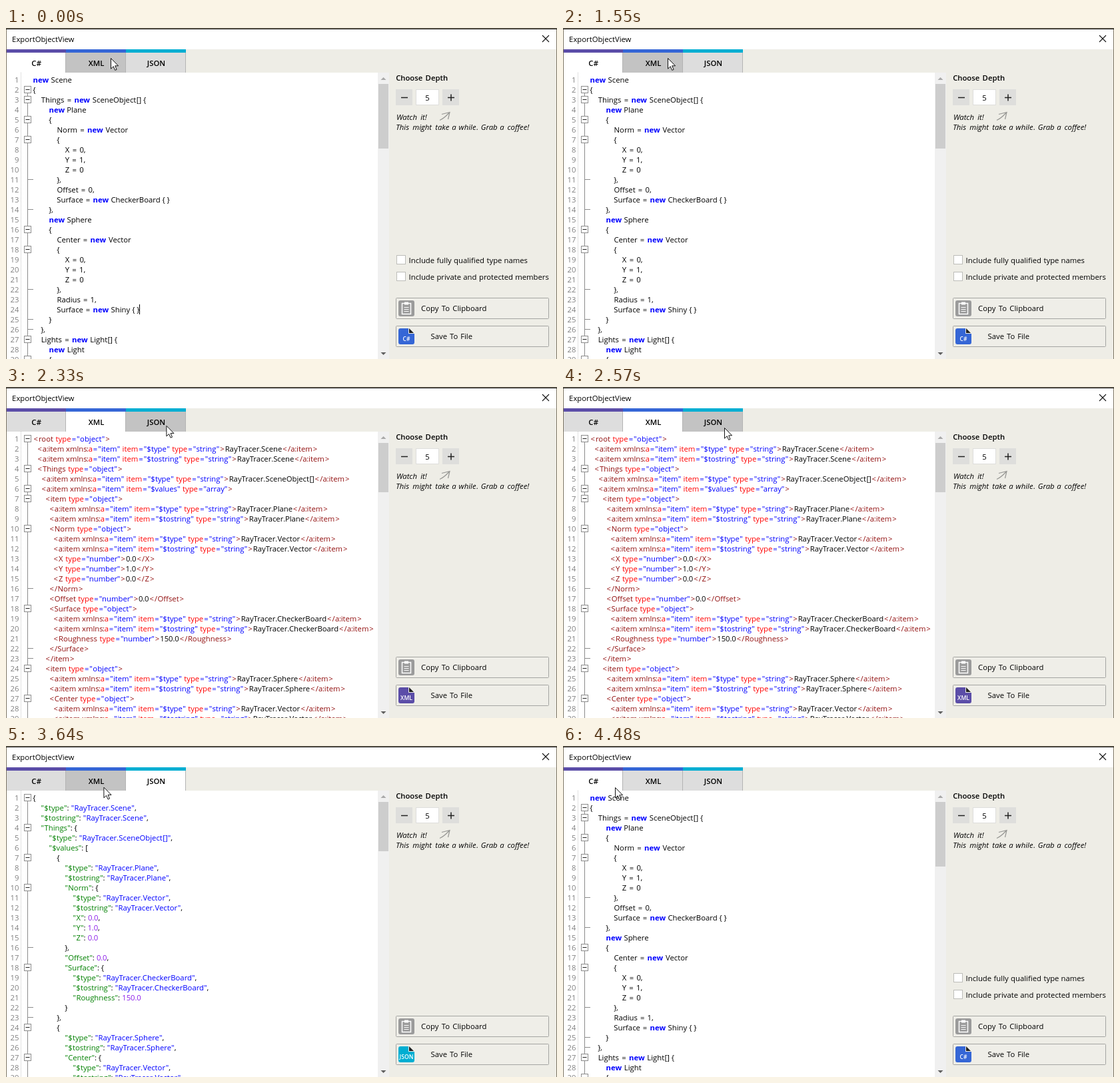
These frames come from a looping animation (827x497 px, 5280 ms). An HTML page:

```html
<!DOCTYPE html>
<html lang="en">
<head>
<meta charset="utf-8">
<title>ExportObjectView</title>
<style>
  html, body { margin: 0; width: 100%; height: 100%; overflow: hidden; background: #eeede6; }
  svg { display: block; width: 827px; height: 497px; }
  text { font-family: "Open Sans", "Noto Sans", sans-serif; font-size: 11.3px; text-anchor: middle; }
</style>
</head>
<body>
<svg id="stage" viewBox="0 0 827 497" xmlns="http://www.w3.org/2000/svg"></svg>
<script>
const LOOP = 5280;
const PURPLE = '#5b4da8', BLUE = '#3566d6', CYAN = '#00aed2';
const svg = document.getElementById('stage');

function add(parent, name, attrs, content) {
  const el = document.createElementNS('http://www.w3.org/2000/svg', name);
  for (const key in attrs) el.setAttribute(key, attrs[key]);
  if (content) el.textContent = content;
  parent.appendChild(el);
  return el;
}
const rect = (parent, x, y, width, height, fill, more) =>
  add(parent, 'rect', { x, y, width, height, fill, ...more });
const line = (parent, d, stroke, more) =>
  add(parent, 'path', { d, stroke, fill: 'none', ...more });
const show = (el, on) => el.setAttribute('visibility', on ? 'visible' : 'hidden');

// Advance widths in thousandths of an em, used to lay out words.
const groups = {
  217: '.,:;', 242: 'ijl', 266: 'I', 274: ' ', 284: '!', 302: '[]{}', 313: 'f', 339: 't',
  348: 'r', 357: 'J', 390: '/', 392: '"', 424: 's', 452: 'z', 459: 'x', 462: 'c', 471: 'L',
  479: 'v', 484: 'y', 488: 'F', 497: 'k', 506: 'E', 509: 'a', 523: 'e', 524: 'T', 531: 'S',
  539: '$0123456789', 553: 'Y', 560: 'P', 565: 'hnu', 570: 'Z', 573: 'B', 586: 'o',
  588: 'bdgpq', 590: 'X', 591: '#', 598: 'R', 619: 'C', 621: 'V', 684: '<>=+', 686: 'G',
  701: 'D', 710: 'H', 723: 'w', 748: 'N', 754: 'O', 861: 'm', 898: 'M', 934: 'W'
};
const advance = {};
for (const w in groups) for (const c of groups[w]) advance[c] = w * 0.01205;
const boldness = { 400: 1, 600: 1.04, 700: 1.085 };

function measure(s, weight = 400) {
  let w = 0;
  for (const c of s) w += advance[c] || 6.5;
  return w * boldness[weight];
}

// Runs are [string, colour, weight]; every word is centred in its own box.
function write(parent, x, y, runs, more) {
  const el = add(parent, 'text', { y, ...more });
  for (const [s, fill, weight = 400] of runs) {
    for (const word of s.match(/\s+|[A-Za-z]+!?|\d+|./g)) {
      const w = measure(word, weight);
      if (word.trim()) {
        add(el, 'tspan', { x: (x + w / 2).toFixed(2), fill, 'font-weight': weight }, word);
      }
      x += w;
    }
  }
}
const label = (parent, x, y, s, weight, more) =>
  write(parent, x, y, [[s, '#000', weight]], more);

// Code listings; one leading space is one indent level.
const csharp = `new Scene
{
 Things = new SceneObject[] {
  new Plane
  {
   Norm = new Vector
   {
    X = 0,
    Y = 1,
    Z = 0
   },
   Offset = 0,
   Surface = new CheckerBoard { }
  },
  new Sphere
  {
   Center = new Vector
   {
    X = 0,
    Y = 1,
    Z = 0
   },
   Radius = 1,
   Surface = new Shiny { }
  }
 },
 Lights = new Light[] {
  new Light
  {`.split('\n');

const pad = n => ' '.repeat(n);
const xOpen = (n, tag) => `${pad(n)}<${tag} type="object">`;
const xNum = (n, tag, v) => `${pad(n)}<${tag} type="number">${v}</${tag}>`;
const xItem = (n, key, type) =>
  `${pad(n)}<a:item xmlns:a="item" item="$${key}" type="string">RayTracer.${type}</a:item>`;
const xPair = (n, type) => [xItem(n, 'type', type), xItem(n, 'tostring', type)];
const xml = [
  xOpen(0, 'root'), ...xPair(1, 'Scene'), xOpen(1, 'Things'), xItem(2, 'type', 'SceneObject[]'),
  '  <a:item xmlns:a="item" item="$values" type="array">',
  xOpen(3, 'item'), ...xPair(4, 'Plane'), xOpen(4, 'Norm'), ...xPair(5, 'Vector'),
  xNum(5, 'X', '0.0'), xNum(5, 'Y', '1.0'), xNum(5, 'Z', '0.0'), '    </Norm>',
  xNum(4, 'Offset', '0.0'), xOpen(4, 'Surface'), ...xPair(5, 'CheckerBoard'),
  xNum(5, 'Roughness', '150.0'), '    </Surface>', '   </item>',
  xOpen(3, 'item'), ...xPair(4, 'Sphere'), xOpen(4, 'Center'), ...xPair(5, 'Vector')
];

const jLine = (n, key, v) => `${pad(n)}"${key}": ${v}`;
const jType = (n, key, type) => jLine(n, key, `"RayTracer.${type}",`);
const jPair = (n, type) => [jType(n, '$type', type), jType(n, '$tostring', type)];
const json = [
  '{', ...jPair(1, 'Scene'), jLine(1, 'Things', '{'), jType(2, '$type', 'SceneObject[]'),
  jLine(2, '$values', '['), '   {', ...jPair(4, 'Plane'), jLine(4, 'Norm', '{'),
  ...jPair(5, 'Vector'), jLine(5, 'X', '0.0,'), jLine(5, 'Y', '1.0,'), jLine(5, 'Z', '0.0'),
  '    },', jLine(4, 'Offset', '0.0,'), jLine(4, 'Surface', '{'), ...jPair(5, 'CheckerBoard'),
  jLine(5, 'Roughness', '150.0'), '    }', '   },', '   {', ...jPair(4, 'Sphere'),
  jLine(4, 'Center', '{'), ...jPair(5, 'Vector')
];

// Each regex group takes the colour at the same index.
const views = [
  { name: 'C#', color: PURPLE, icon: BLUE, lines: csharp, indent: 12, thumb: 97,
    folds: [2, 3, 5, 7, 16, 18, 27, 29], ends: [11, 14, 22, 25, 26],
    syntax: /(\bnew\b)|((?:(?!\bnew\b).)+)/g, colors: ['#0000ff', '#000'], bold: 0 },
  { name: 'XML', color: BLUE, icon: PURPLE, lines: xml, indent: 6, thumb: 74,
    folds: [1, 4, 6, 7, 10, 18, 24, 27], ends: [16, 22, 23],
    syntax: /(<\/?[\w:]+|>|xmlns:)|(\w+(?==))|(="[^"]*")|([^<>"=\s]+|\s+)/g,
    colors: ['#921010', '#ff0000', '#0000ff', '#000'] },
  { name: 'JSON', color: CYAN, icon: CYAN, lines: json, indent: 12, thumb: 74,
    folds: [1, 4, 7, 10, 18, 24, 27], ends: [16, 22, 23],
    syntax: /("[^"]*"(?=:))|("[^"]*")|(\d[\d.]*)|([^"\d]+)/g,
    colors: ['#008000', '#0000ff', '#8a1be8', '#000'] }
];

function colorRuns(view, s) {
  return [...s.matchAll(view.syntax)].map(m => {
    const i = m.slice(1).findIndex(g => g !== undefined);
    return [m[0], view.colors[i], i === view.bold ? 700 : 400];
  });
}

// Window
rect(svg, 0, 0, 827, 497, '#eeede6');
rect(svg, 0, 0, 827, 32, '#fff');
label(svg, 8.5, 21, 'ExportObjectView');
line(svg, 'M805 11L815 21M815 11L805 21', '#111', { 'stroke-width': 1.1 });

// Tabs
const tabs = views.map((view, i) => {
  const x = i * 90;
  const body = rect(svg, x, 37, 90, 30, '#ddd');
  rect(svg, x, 32, 90, 5, view.color);
  rect(svg, x + 89, 37, 1, 30, '#b4b4b4');
  label(svg, x + 45.5 - measure(view.name, 600) / 2, 57, view.name, 600);
  return body;
});

// Editor
rect(svg, 1, 67, 557, 430, '#fff');
line(svg, 'M22.5 67V497', '#c4c4c4', { 'stroke-dasharray': '1 1' });
for (let n = 1; n < 30; n++) {
  write(svg, 19.5 - measure(String(n)), 67 + 15 * n, [[String(n), '#808080']]);
}
rect(svg, 558, 67, 17, 430, '#f0f0f0');
line(svg, 'M562.5 78L566.5 74L570.5 78Z', 'none', { fill: '#a8a8a8' });
line(svg, 'M562.5 487L566.5 491L570.5 487Z', 'none', { fill: '#606060' });
const thumb = rect(svg, 559, 84, 15, 97, '#cdcdcd');

// Side panel
label(svg, 584.5, 79, 'Choose Depth', 600);
for (const x of [585, 655]) rect(svg, x, 92, 25, 24, '#dededc');
rect(svg, 615.5, 92.5, 34, 23, '#fff', { stroke: '#dededc' });
line(svg, 'M593 104.5H603M663 104.5H673M668 99.5V109.5', '#222', { 'stroke-width': 1.5 });
label(svg, 629.3, 108.5, '5');
const italic = { 'font-style': 'italic' };
label(svg, 584.5, 137.5, 'Watch it!', 400, italic);
label(svg, 584.5, 152.5, 'This might take a while. Grab a coffee!', 400, italic);
line(svg, 'M651 138.5Q657 136 665 127.5M654 129.5L666 126.5L663.5 137', '#969693', { 'stroke-width': 1.2 });

const options = add(svg, 'g', {});
['Include fully qualified type names', 'Include private and protected members'].forEach((s, i) => {
  rect(options, 586.5, 341.5 + 25 * i, 13, 13, '#fff', { stroke: '#bdbdb9' });
  label(options, 604.5, 352.5 + 25 * i, s);
});

for (const y of [405.5, 447.5]) {
  rect(svg, 585.5, y, 229, 31, '#efeee8', { stroke: '#a5a5a2', rx: 1 });
}
label(svg, 622.5, 425, 'Copy To Clipboard');
label(svg, 637.5, 467, 'Save To File');
rect(svg, 589, 409, 24, 24, '#9b9b9b', { rx: 3 });
rect(svg, 594.5, 413.5, 13, 16, 'none', { stroke: '#fff', 'stroke-width': 1.5 });
rect(svg, 598, 411.5, 6, 4, '#fff');
line(svg, 'M597.5 419.5H604.5M597.5 422.5H604.5M597.5 425.5H604.5', '#fff');

// Parts that belong to one view each
for (const view of views) {
  const g = view.group = add(svg, 'g', {});
  const rowY = n => 62.5 + 15 * n;
  line(g, `M32.5 ${rowY(view.folds[0])}V497`, '#8c8c8c');
  for (const n of view.ends) line(g, `M32.5 ${rowY(n)}H41`, '#8c8c8c');
  for (const n of view.folds) {
    rect(g, 27.5, rowY(n) - 5, 10, 10, '#fff', { stroke: '#8c8c8c' });
    line(g, `M29.5 ${rowY(n)}H35.5`, '#222');
  }
  view.lines.forEach((s, i) => {
    const code = s.trimStart();
    write(g, 40.5 + (s.length - code.length) * view.indent, 82 + 15 * i, colorRuns(view, code));
  });
  line(g, 'M592 451H604V459H613V472Q613 475 610 475H592Q589 475 589 472V454Q589 451 592 451Z',
    'none', { fill: view.icon });
  line(g, 'M605 451L612 458H605Z', 'none', { fill: '#222' });
  add(g, 'text', { x: 601, y: 470, fill: '#fff', style: 'font-size:8.6px', 'font-weight': 600 }, view.name);
}
const caret = rect(svg, 200, 415, 1, 15, '#000');

// Window frame
rect(svg, .5, .5, 826, 497, 'none', { stroke: '#7d7564' });
rect(svg, 0, 1, 827, 1, '#111');

const cursor = add(svg, 'path', {
  d: 'M.5 .5V16.2L4.2 12.7L6.7 18.4L9.1 17.4L6.7 11.8H11.6Z',
  fill: '#fff', stroke: '#111', 'stroke-linejoin': 'round'
});

// Eased progress in discrete ticks; the first tick already moves.
function progress(t, start, tick, count) {
  const u = Math.max(0, Math.min(1, (Math.floor((t - start) / tick) + 1) / count));
  return u * u * (3 - 2 * u);
}

// To the third tab, a little back, then over to the first tab.
function pointer(t) {
  const out = progress(t, 2170, 40, 7);
  const back = progress(t, 2450, 40, 4);
  const home = progress(t, 3370, 30, 18);
  return [157 + 104 * out - 19 * back - 164 * home, 45 + 16 * out + home];
}

function draw(t) {
  const active = t < 1880 || t >= 4480 ? 0 : t < 3270 ? 1 : 2;
  const [x, y] = pointer(t);
  const hover = Math.floor(x / 90);
  tabs.forEach((tab, i) =>
    tab.setAttribute('fill', i === active ? '#fff' : i === hover ? '#c3c3c3' : '#ddd'));
  views.forEach((view, i) => show(view.group, i === active));
  thumb.setAttribute('height', views[active].thumb);
  show(options, active === 0);
  show(caret, t < 490 || (t >= 1020 && t < 1550));
  cursor.setAttribute('transform', `translate(${x.toFixed(1)} ${y.toFixed(1)})`);
}

const start = performance.now();
function tick() {
  draw((performance.now() - start) % LOOP);
  requestAnimationFrame(tick);
}
tick();
</script>
</body>
</html>
```
